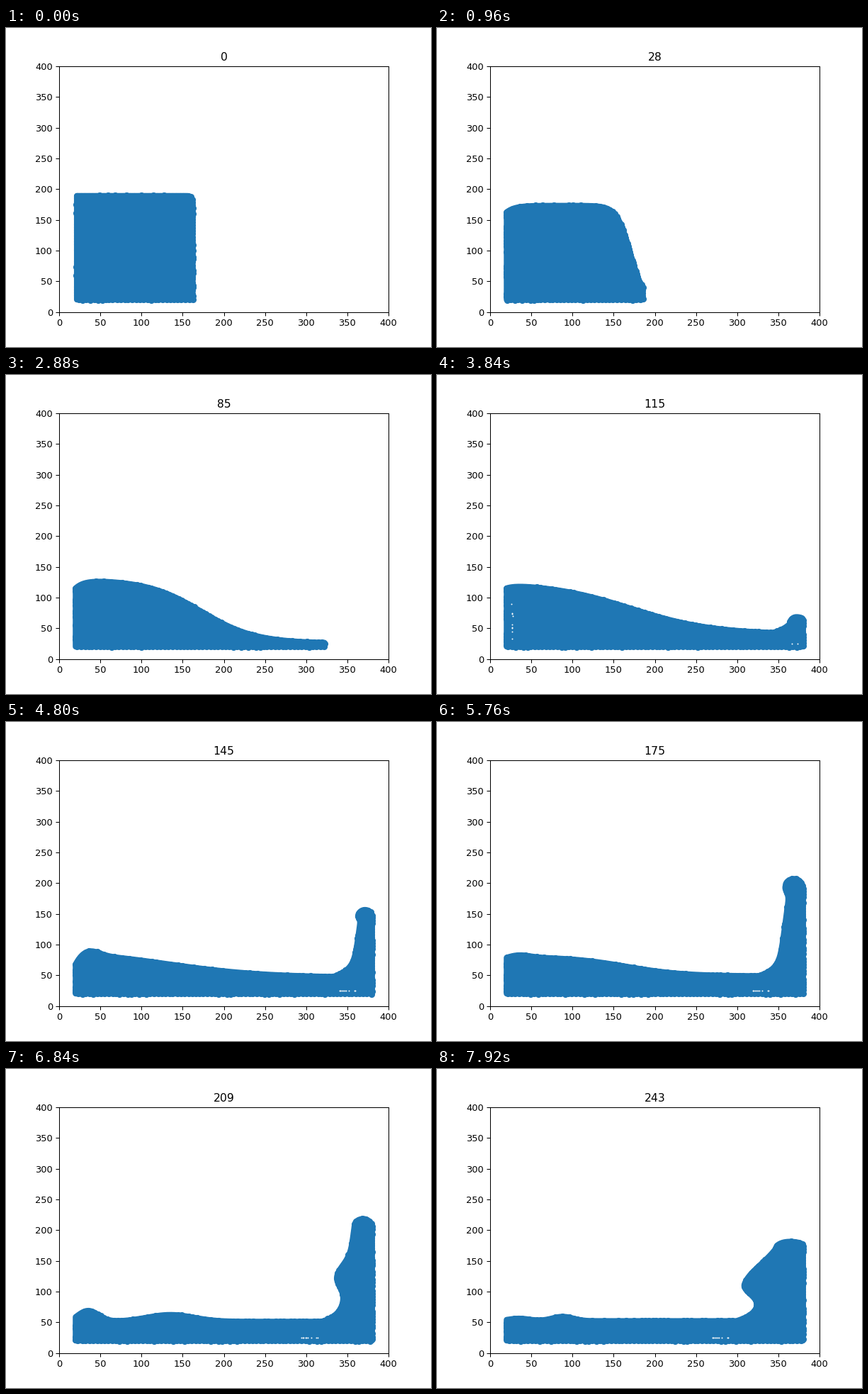
Recreate the animation shown at these times as a matplotlib script. Size 600x450 px, loop 8000 ms.

```python
import numpy as np
import matplotlib.pyplot as plt
from matplotlib.animation import FuncAnimation
from matplotlib.patches import Polygon

WATER = "#1f77b4"
FLOOR, LEFT, RIGHT = 20, 20, 380
TICK = 40          # ms per drawn frame
HOLD = 3           # drawn frames per picture
FRAMES = 200
DOT_GAP = 4.6      # spacing of the surface particles
FOOT, FOOT_H = 24, 11   # how the pool curves up into the wall jet
CAP = 11                # height of the jet's rounded top

rng = np.random.default_rng(4)
jitter = rng.uniform(-0.6, 0.6, (600, 2))
wall_gaps = np.column_stack([rng.normal(26.5, 0.5, 9), rng.uniform(30, 106, 9)])
floor_gaps = np.column_stack([rng.normal(0, 8, 9), np.full(9, 24.5)])


def track(n, *keys):
    """Value at step n between (step, value) keys."""
    return np.interp(n, *zip(*keys))


def bell(d):
    return np.exp(-d ** 2)


def toe(n):
    """Front of the wave, speeding up along the floor until the wall."""
    return min(RIGHT, 162 + 5.1 * n * n / (n + 145))


def pool(n, x):
    """Surface height: a sinking step, then waves sloshing at the left."""
    top = track(n, (0, 189), (28, 173), (55, 140), (85, 129), (115, 124),
                (145, 91), (175, 80), (209, 51), (243, 52))
    base = track(n, (0, 20), (55, 24), (100, 26), (115, 40), (145, 46), (209, 51), (243, 52))
    middle = track(n, (0, 165), (55, 174), (115, 171), (145, 130), (175, 165))
    width = track(n, (0, 1.2), (28, 8), (55, 16), (115, 50), (145, 60), (175, 35))
    y = base + (top - base) / (1 + np.exp((x - middle) / width))

    crest = track(n, (115, 0), (145, 10), (175, 4), (209, 18), (243, 4))
    swell = track(n, (175, 0), (209, 11), (243, 7))
    swell_x = track(n, (209, 135), (243, 88))
    swell_w = track(n, (209, 40), (243, 18))
    dip = track(n, (0, 0), (55, 21), (115, 5), (145, 22), (175, 3), (243, 0))
    return (y + crest * bell((x - 35) / 18) + swell * bell((x - swell_x) / swell_w)
            - dip * np.exp((LEFT - x) / 10))


def jet_edge(n, y, foot_y):
    """Left side of the water climbing the right wall."""
    edge = track(n, (115, 375), (145, 362), (175, 355), (209, 348), (243, 335))
    lean = track(n, (209, 0.1), (243, 0.25))
    bulge = track(n, (115, 0), (145, 5), (175, 6), (209, 13), (243, 29))
    bulge_y = track(n, (115, 70), (145, 150), (175, 194), (209, 124), (243, 112))
    above = track(n, (145, 8), (175, 12), (209, 26), (243, 45))
    spread = np.where(y > bulge_y, above, min(above, 23))
    return (edge + lean * (y - 100) - bulge * bell((y - bulge_y) / spread)
            - FOOT * np.exp((foot_y - y) / FOOT_H))


def jet(n):
    foot_y = float(pool(n, 330))
    top = max(foot_y + 2, 220 - 0.021 * (n - 200) ** 2)
    neck = max(foot_y, top - CAP)
    y = np.linspace(foot_y, neck, 80)
    side = np.column_stack([jet_edge(n, y, foot_y), y])

    x0 = side[-1, 0]
    mid = (x0 + RIGHT) / 2
    shoulder = min(top - foot_y, track(n, (115, 4), (190, 19), (243, 6)))
    a = np.linspace(np.pi, 0, 30)
    drop = np.where(a > np.pi / 2, top - neck, shoulder)
    cap = np.column_stack([mid + (RIGHT - mid) * np.cos(a), top - drop * (1 - np.sin(a))])
    return np.vstack([side, cap])


def outline(n):
    left = LEFT + 1.5 * np.exp(-n / 8)
    end = toe(n)
    front = np.empty((0, 2))
    if end >= RIGHT:
        front = jet(n)
        end = front[0, 0]
    x = np.linspace(left, end, 250)
    pts = np.vstack([np.column_stack([x, pool(n, x)]), front])
    pts[:, 0] = np.clip(pts[:, 0], left, RIGHT)
    pts[:, 1] = np.maximum(pts[:, 1], FLOOR)
    return np.vstack([pts, [pts[-1, 0], FLOOR], [left, FLOOR], pts[0]])


def resample(points, gap):
    d = np.concatenate([[0], np.cumsum(np.hypot(*np.diff(points, axis=0).T))])
    s = np.linspace(0, d[-1], int(d[-1] / gap) + 1)
    return np.column_stack([np.interp(s, d, points[:, k]) for k in (0, 1)])


def gaps(n):
    """Small openings between the particles."""
    if n < 95:
        return np.empty((0, 2))
    drift = floor_gaps + [375 - 0.72 * (n - 115), 0]
    drift = drift[drift[:, 0] < RIGHT - 4]
    if n < 135:
        return np.vstack([wall_gaps, drift[:2]])
    return drift


def counter(step):
    return int(np.floor(track(step, (0, 0), (16, 55), (66, 242.5)) + 0.5))


fig, ax = plt.subplots(figsize=(6.4, 4.8), dpi=93.75)
ax.set_xlim(0, 400)
ax.set_ylim(0, 400)
title = ax.set_title("0")
water = ax.add_patch(Polygon(outline(0), closed=True, facecolor=WATER,
                             edgecolor=WATER, linewidth=6.2, joinstyle="round"))
dots = ax.scatter([], [], s=36, color=WATER)
holes = ax.scatter([], [], s=2.2, color="white", linewidths=0, zorder=2)


def draw(frame):
    n = counter(frame // HOLD)
    shape = outline(n)
    ring = resample(shape, DOT_GAP)
    water.set_xy(shape)
    dots.set_offsets(ring + jitter[:len(ring)])
    holes.set_offsets(gaps(n))
    title.set_text(str(n))
    return water, dots, holes, title


anim = FuncAnimation(fig, draw, frames=FRAMES, interval=TICK,
                     repeat=True, repeat_delay=0, blit=False)
plt.show()
```
